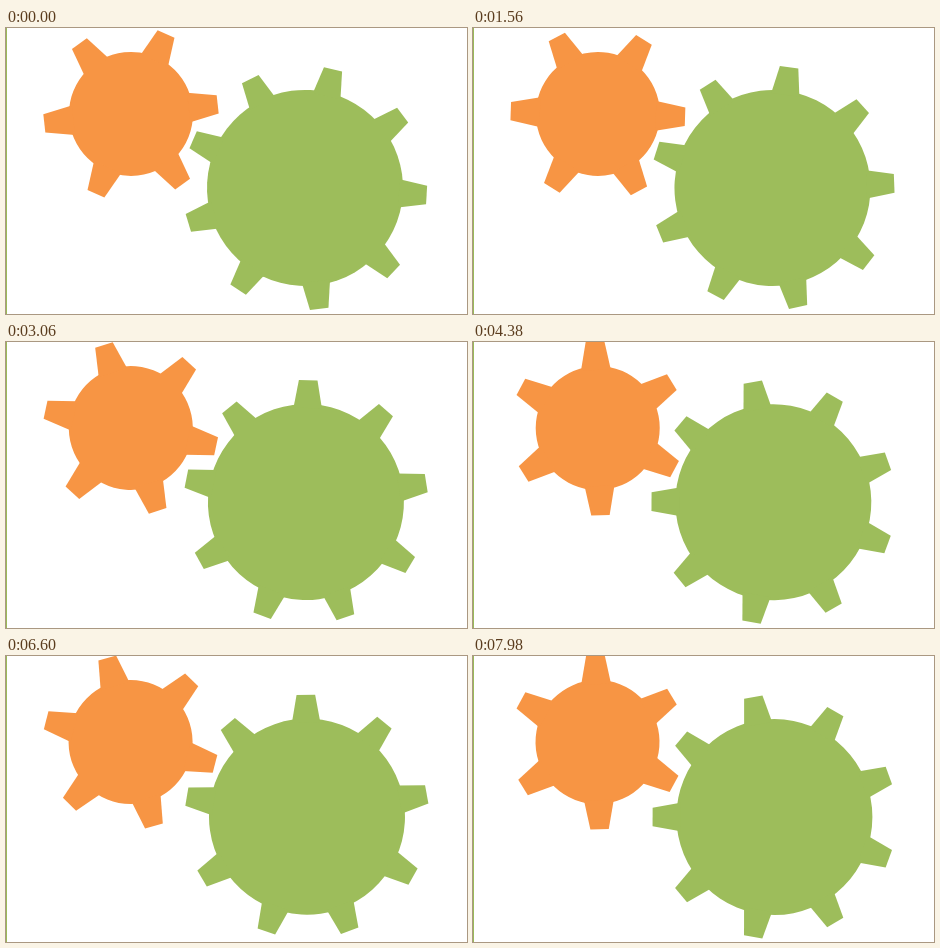
An HTML page for the animation above (8 s loop, 461 by 286 pixels).

```html
<!DOCTYPE html>
<html lang="en">
<head>
<meta charset="utf-8">
<title>Meshing gears</title>
<style>
  html, body { margin: 0; width: 100%; height: 100%; overflow: hidden; background: #fff; }
  svg { display: block; width: 100vw; height: 100vh; }
</style>
</head>
<body>
<svg viewBox="0 0 461 286">
  <rect width="1" height="286" fill="#9bbb59"/>
  <g id="small" fill="#f79544"></g>
  <g id="large" fill="#9dbd5b"></g>
</svg>
<script>
const LOOP = 8000, STEP = 60, LAST = 133;

const gears = [
  { id: 'small', teeth: 6, radius: 62, root: [58, 14.9], tip: [87.2, 9.2],
    start: -6.3, turn: -1.993, center: p => [125 - 0.5 * p, 85.9 + 0.2 * p] },
  { id: 'large', teeth: 9, radius: 98, root: [94, 14.2], tip: [121.8, 9.3],
    start: 3.3, turn: 1.3288, center: p => [299 + 2.4 * p, 159.9 + 1.1 * p * p] }
];

// Teeth are trapezoids, given as [distance, half width] at root and tip.
function build(gear) {
  const [r0, w0] = gear.root, [r1, w1] = gear.tip;
  const points = `${r0},${-w0} ${r1},${-w1} ${r1},${w1} ${r0},${w0}`;
  let shapes = `<circle r="${gear.radius}"/>`;
  for (let i = 0; i < gear.teeth; i++) {
    shapes += `<polygon points="${points}" transform="rotate(${i * 360 / gear.teeth})"/>`;
  }
  gear.node = document.getElementById(gear.id);
  gear.node.innerHTML = shapes;
}

function draw(time) {
  const step = Math.floor((time % LOOP) / STEP);
  for (const gear of gears) {
    const [x, y] = gear.center(step / LAST);
    const angle = gear.start + gear.turn * step;
    gear.node.setAttribute('transform', `translate(${x} ${y}) rotate(${angle})`);
  }
}

gears.forEach(build);
const begin = performance.now();
function tick() {
  draw(performance.now() - begin);
  requestAnimationFrame(tick);
}
tick();
</script>
</body>
</html>
```
